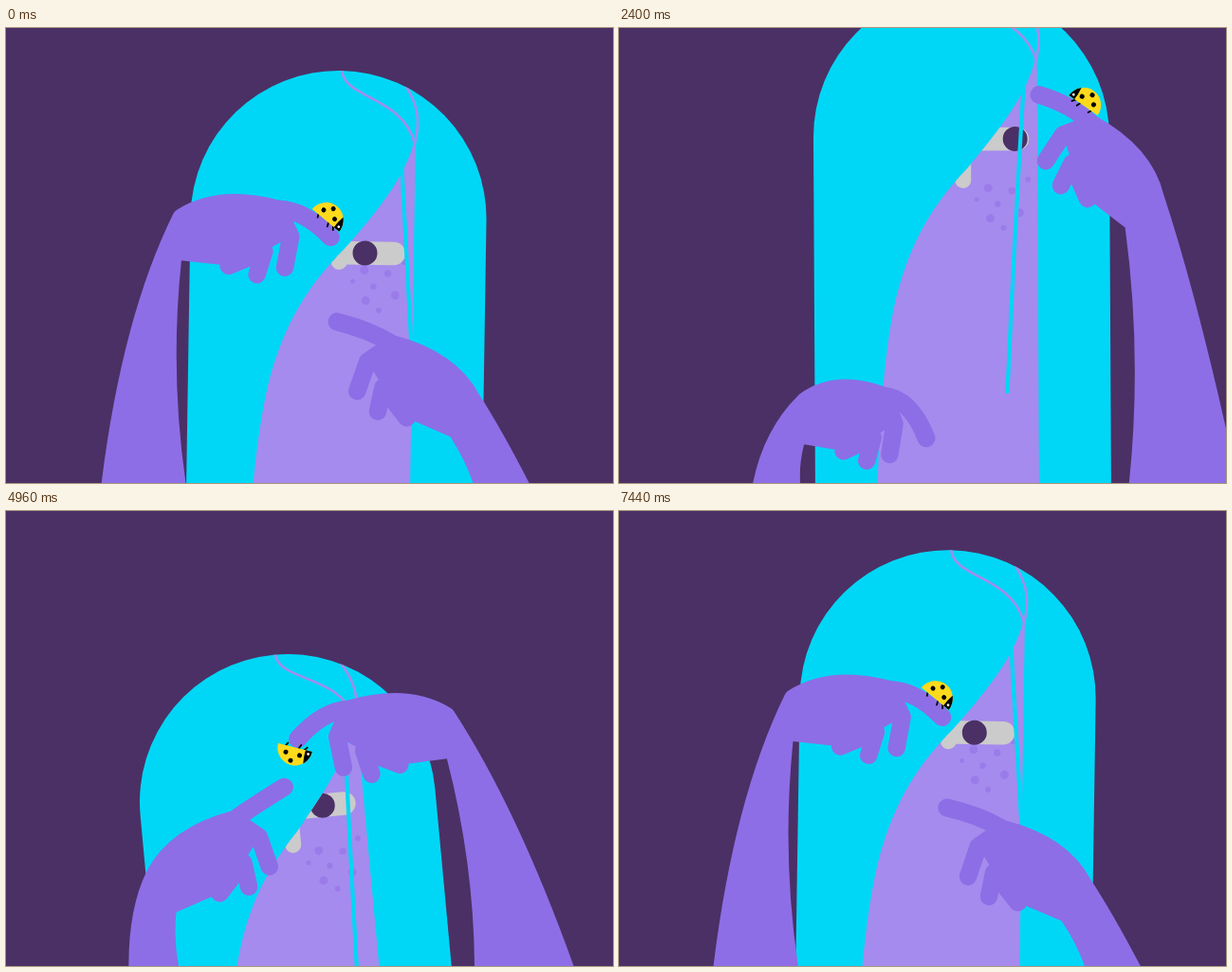
Write an HTML page with a canvas that moves like this. It is 640 px wide and 480 px high and loops after 7480 ms.

```html
<!DOCTYPE html>
<html lang="en">
<head>
<meta charset="utf-8">
<title>Ladybug walk</title>
<style>
html, body { margin: 0; width: 100%; height: 100%; overflow: hidden; background: #4b3065; }
canvas { display: block; width: 640px; height: 480px; }
</style>
</head>
<body>
<canvas id="stage" width="640" height="480"></canvas>
<script>
const LOOP = 7480, STEP = 40, FLOOR = 490;
const BG = '#4b3065', HAIR = '#00d7f6', FACE = '#a58bed', ARM = '#8d6ee6';
const FRECKLE = '#9b7be9', EYE = '#cbcbcb', BUG = '#ffda1c', INK = '#000';
const ctx = document.getElementById('stage').getContext('2d');

// time, x, y, tilt
const headKeys = [
  [0, 350.5, 201, .9], [700, 400, 258, -.4], [1640, 421, 156, -.6], [2400, 361, 115, -.3],
  [3760, 299, 188, 0], [4960, 297, 307, -5.3], [6080, 218, 160, -3.4], [6700, 262, 125, -1]
];

// time, elbow x, wrist x, wrist y, hand angle, index bend
const left = { side: 1, thickness: .2, keys: [
  [0, 109, 185, 200, -5, 33], [1640, 130, 182, 368, -12, 44], [2400, 149, 196, 394, -4, 49],
  [3760, 173, 203, 392, -18, 40], [4960, 139, 157, 384, -35, 2], [6080, 54, 72, 200, -30, 28]
] };
const right = { side: -1, thickness: .27, keys: [
  [0, 546, 491, 392, -35, 13], [1640, 668, 615, 184, -53, 38], [2400, 645, 565, 178, -49, 20],
  [3760, 624, 507, 186, -27.5, 22], [4960, 592, 464, 216, -4, 34], [6080, 538, 450, 288, -6, 55]
] };

const clamp = (v, lo = 0, hi = 1) => Math.max(lo, Math.min(hi, v));
const mix = (a, b, k) => a + (b - a) * k;
const rad = deg => deg * Math.PI / 180;
const wrap = t => (t % LOOP + LOOP) % LOOP;

// Smooth closed curve through timed keys.
function sample(keys, time) {
  const t = wrap(time), n = keys.length;
  const i = keys.findLastIndex(k => k[0] <= t);
  const [a, b, c, d] = [-1, 0, 1, 2].map(o => {
    const j = i + o, [at, ...values] = keys[(j + n) % n];
    return [at + Math.floor(j / n) * LOOP, ...values];
  });
  const span = c[0] - b[0], u = (t - b[0]) / span, v = 1 - u;
  return b.map((p, k) => {
    const m = (c[k] - a[k]) / (c[0] - a[0]) * span;
    const w = (d[k] - b[k]) / (d[0] - b[0]) * span;
    return v * v * (1 + 2 * u) * p + u * v * v * m + u * u * (3 - 2 * u) * c[k] - u * u * v * w;
  }).slice(1);
}

function stroke(path, color, width) {
  ctx.strokeStyle = color;
  ctx.lineWidth = width;
  ctx.stroke(new Path2D(path));
}

function fill(path, color) {
  ctx.fillStyle = color;
  ctx.fill(new Path2D(path));
}

function dot(x, y, r, color) {
  ctx.fillStyle = color;
  ctx.beginPath();
  ctx.arc(x, y, r, 0, 7);
  ctx.fill();
}

// One hand: x runs from the wrist to the knuckles, y towards the palm.
function pose(arm, t) {
  const [elbow, x, y, angle, bend] = sample(arm.keys, t);
  const squeeze = 1 - .18 * clamp((bend - 36) / 4);
  const part = (px, py) => [px * squeeze, py];
  const knuckle = part(102, 0), a = rad(bend);
  return {
    ...arm, elbow, x, y, angle: rad(angle), knuckle,
    back: part(42, -22),
    curve: [knuckle[0] + 28, bend * .1],
    tip: [knuckle[0] + 63 * Math.cos(a), 63 * Math.sin(a)],
    joint: part(113, 30), web: part(84, 43),
    curled: [part(104, 62), part(74, 67), part(45, 55)],
    heel: [-4, 45]
  };
}

function place(hand, [px, py]) {
  const c = Math.cos(hand.angle), s = Math.sin(hand.angle);
  return [hand.x + hand.side * (px * c - py * s), hand.y + px * s + py * c];
}

function drawArm(hand) {
  const at = p => place(hand, p);
  const height = FLOOR - hand.y, heel = at(hand.heel);
  const inner = hand.elbow + hand.side * (24 + hand.thickness * height);
  const innerX = (heel[0] + inner) / 2 - hand.side * height * .055;
  const outerX = mix(hand.x, hand.elbow, .6) - 9;
  const outer = `M${hand.elbow} ${FLOOR}Q${outerX} ${hand.y + height * .38} ${hand.x} ${hand.y}` +
    `Q${at(hand.back)} ${at(hand.knuckle)}`;
  const [t1, t2, t3] = hand.curled.map(at), joint = at(hand.joint), web = at(hand.web);
  fill(`${outer}L${joint}L${web}L${t3}L${heel}` +
    `Q${innerX} ${(heel[1] + FLOOR) / 2} ${inner} ${FLOOR}Z`, ARM);
  stroke(`${outer}Q${at(hand.curve)} ${at(hand.tip)}`, ARM, 19);
  stroke(`M${at(hand.knuckle)}L${joint}L${t1}M${web}L${t2}M${web}L${t3}`, ARM, 18.5);
}

// Point and direction at a distance along the back of the hand and index finger.
function walkHand(hand, distance) {
  const quad = (a, b, c, u) => a.map((v, i) => mix(mix(v, b[i], u), mix(b[i], c[i], u), u));
  const points = [];
  for (let i = 0; i <= 12; i++) points.push(quad([0, 0], hand.back, hand.knuckle, i / 12));
  for (let i = 1; i <= 12; i++) points.push(quad(hand.knuckle, hand.curve, hand.tip, i / 12));
  const steps = points.slice(1).map((p, i) => Math.hypot(p[0] - points[i][0], p[1] - points[i][1]));
  const total = steps.reduce((a, b) => a + b);
  let rest = clamp(distance(total), 0, total), i = 0;
  while (i < steps.length - 1 && rest > steps[i]) rest -= steps[i++];
  const [p, q] = [points[i], points[i + 1]], k = rest / steps[i];
  return { pos: [mix(p[0], q[0], k), mix(p[1], q[1], k)], angle: Math.atan2(q[1] - p[1], q[0] - p[0]) };
}

// The bug walks from wrist to fingertip, turns round the tip, then changes hands.
const ON_RIGHT = 680, ON_LEFT = 5330, TURN = 680, SPEED = .072;
function bugAt(time) {
  const t = wrap(time), onRight = t >= ON_RIGHT && t < ON_LEFT;
  const hand = pose(onRight ? right : left, t);
  const age = onRight ? t - ON_RIGHT : wrap(t - ON_LEFT);
  const stay = onRight ? ON_LEFT - ON_RIGHT : LOOP - ON_LEFT + ON_RIGHT;
  const turn = clamp((age - stay + TURN) / TURN), walked = age * SPEED;
  const spot = walkHand(hand, total => Math.min(walked, total - 8) + 8 * clamp(turn * 4));
  const angle = spot.angle + rad(260) * turn;
  const lift = Math.min(9.5, walked - 12, 9.5 + (.7 - turn) * 70);
  const pos = [spot.pos[0] + lift * Math.sin(angle), spot.pos[1] - lift * Math.cos(angle)];
  return { hand, pos, angle, behind: lift < 9.5 };
}

function drawBug({ hand, pos, angle }) {
  ctx.save();
  ctx.translate(...place(hand, pos));
  ctx.scale(hand.side, 1);
  ctx.rotate(hand.angle + angle);
  stroke('M9-1L12 3M3-1L5 4M-11-1L-9 3', INK, 1.8);
  const shell = new Path2D('M18 0A18.5 19 0 0 0-19 0Z');
  ctx.fillStyle = BUG;
  ctx.fill(shell);
  ctx.clip(shell);
  fill('M20 1V-20H13Q10-8 11 1Z', INK);
  dot(14.5, -3.5, 1.4, '#fff');
  for (const x of [-9, -2, 6]) dot(x, x === -2 ? -14.5 : -7, 2.5, INK);
  ctx.restore();
}

const hairPath = 'M-156 600V0A156 156 0 0 1 156 0V600Z';
const facePath = 'M79-85C71-45 38-5 7 32C-38 78-58 122-71 175C-80 215-89 290-91 400V600H80V-85Z';
const freckles = [[28, 54, 4.5], [53, 57, 3.7], [16, 66, 2.5], [38, 71, 3.2],
  [30, 86, 4.5], [61, 80, 4.5], [44, 96, 3], [70, 45, 3]];

// The eye follows the bug, averaged over a short while.
function gaze(t, x, y) {
  const seen = [-300, -150, 0, 150, 300].map(d => {
    const bug = bugAt(t + d);
    return place(bug.hand, bug.pos);
  });
  const mean = i => seen.reduce((sum, p) => sum + p[i], 0) / seen.length;
  const look = Math.tanh((mean(0) - x - 28) / 45);
  return [41 + 16 * look, clamp(26.7 - 12.7 * look + .36 * (mean(1) - y), -10, 36)];
}

function drawHead(t) {
  const [x, y, tilt] = sample(headKeys, t);
  const drift = (sample(headKeys, t + 20)[0] - sample(headKeys, t - 20)[0]) / 40;
  const [pupilX, eyeY] = gaze(t, x, y);
  const strandX = 63 + 270 * drift;
  ctx.save();
  ctx.translate(x, y);
  ctx.rotate(rad(tilt));
  fill(hairPath, HAIR);
  fill(facePath, FACE);
  ctx.save();
  ctx.clip(new Path2D(hairPath));
  stroke('M1-158C2-126 65-131 79-81', FACE, 2.6);
  stroke('M69-141C82-120 85-105 79-79', FACE, 2.6);
  ctx.clip(new Path2D(facePath));
  for (const f of freckles) dot(...f, FRECKLE);
  stroke('M1.5 15V45.5', EYE, 17);
  stroke(`M10 ${eyeY}H59`, EYE, 24.5);
  dot(pupilX, eyeY, 13, BG);
  ctx.restore();
  stroke(`M66-55Q${(64 + strandX) / 2} 100 ${strandX} 269`, HAIR, 4.2);
  ctx.restore();
}

function draw(now) {
  const t = Math.floor(now % LOOP / STEP) * STEP, bug = bugAt(t);
  ctx.fillStyle = BG;
  ctx.fillRect(0, 0, 640, 480);
  drawHead(t);
  if (bug.behind) drawBug(bug);
  drawArm(pose(left, t));
  drawArm(pose(right, t));
  if (!bug.behind) drawBug(bug);
}

ctx.lineCap = ctx.lineJoin = 'round';
const start = performance.now();
function tick() {
  draw(performance.now() - start);
  requestAnimationFrame(tick);
}
tick();
</script>
</body>
</html>
```
